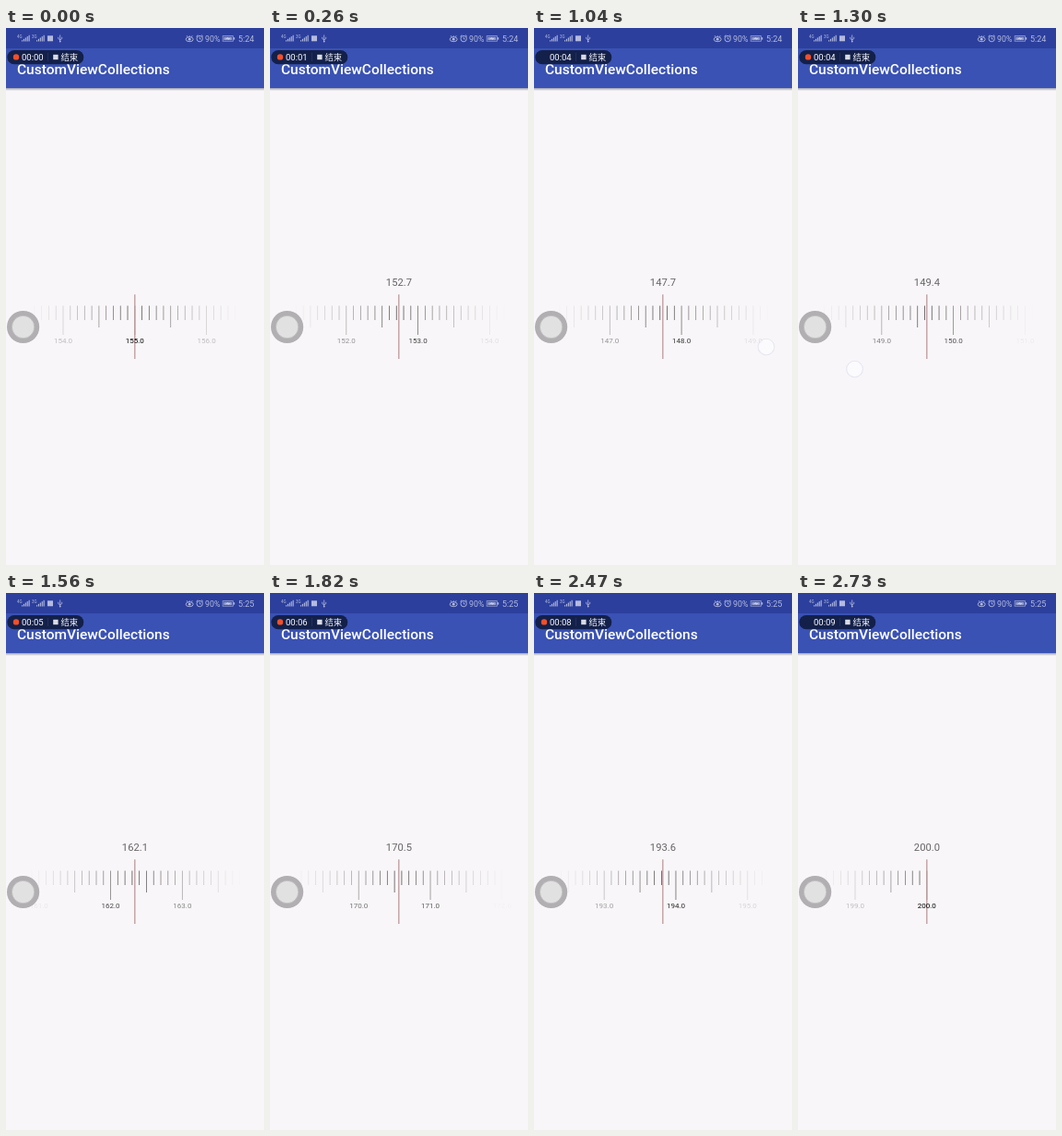
Write an HTML page with a canvas that moves like this. It is 280 by 581 pixels and loops after 2.86 s.

```html
<!DOCTYPE html>
<html lang="en">
<head>
<meta charset="utf-8">
<title>Ruler view</title>
<style>
html, body { margin: 0; width: 100%; height: 100%; overflow: hidden; background: #f8f6f8; }
canvas { display: block; width: 280px; height: 581px; }
</style>
</head>
<body>
<canvas id="stage"></canvas>
<script>
const W = 280, H = 581, STEP = 130, COUNT = 22;
const CENTER = 139.8, UNIT = 77.8, FADE = 120, MAX = 200;
const ICON = '#b4bbde';
const SANS = 'Roboto, "Noto Sans", sans-serif';
const CJK = '"Noto Sans CJK SC", "Noto Sans CJK", sans-serif';

const lerp = (a, b, u) => a + (b - a) * u;
const settle = u => 1 - Math.pow(1 - u, 1.28);
const fling = u => u * u * (3 - 2 * u);

// Ruler moves, in steps
const moves = [
  { start: 0, end: 6, from: 155, to: 149.4, ease: settle },
  { start: 6, end: 9, from: 149.4, to: 147.2, ease: settle },
  { start: 9, end: 14, from: 147.2, to: 170.56, ease: fling },
  { start: 14.225, end: 21, from: 170.56, to: MAX, ease: fling }
];

// Finger strokes, in steps
const swipes = [
  { start: 6, end: 8, from: [161.5, 327], to: [252, 345] },
  { start: 9, end: 10, from: [200, 352], to: [61.5, 369] },
  { start: 16, end: 17, from: [170, 338], to: [83.5, 346] }
];

const canvas = document.getElementById('stage');
const ctx = canvas.getContext('2d');
const dpr = window.devicePixelRatio || 1;
canvas.width = W * dpr;
canvas.height = H * dpr;
ctx.scale(dpr, dpr);

function valueAt(step) {
  const m = moves.filter(move => move.start <= step).pop() || moves[0];
  const u = Math.min(1, Math.max(0, (step - m.start) / (m.end - m.start)));
  return lerp(m.from, m.to, m.ease(u));
}

function rect(x, y, w, h, color) {
  ctx.fillStyle = color;
  ctx.fillRect(x, y, w, h);
}

function disc(x, y, r, fill, stroke, width = 1) {
  ctx.beginPath();
  ctx.arc(x, y, r, 0, Math.PI * 2);
  if (fill) { ctx.fillStyle = fill; ctx.fill(); }
  if (stroke) { ctx.strokeStyle = stroke; ctx.lineWidth = width; ctx.stroke(); }
}

function path(points, color, width) {
  ctx.beginPath();
  points.forEach(([x, y], i) => i ? ctx.lineTo(x, y) : ctx.moveTo(x, y));
  ctx.strokeStyle = color;
  ctx.lineWidth = width;
  ctx.stroke();
}

function text(str, x, y, size, color, align = 'left', weight = 400, family = SANS) {
  ctx.font = `${weight} ${size}px ${family}`;
  ctx.fillStyle = color;
  ctx.textAlign = align;
  ctx.fillText(str, x, y);
}

function signal(x, label) {
  text(label, x, 11, 4.5, ICON);
  for (let i = 0; i < 5; i++) {
    const h = 1.3 + i * 1.35;
    rect(x + 5 + i * 1.9, 14.5 - h, 1.1, h, ICON);
  }
}

function usb(x) {
  path([[x, 7.5], [x, 15]], ICON, 0.8);
  path([[x - 2, 9.8], [x - 2, 11.5], [x, 13], [x + 2, 11.5], [x + 2, 9.8]], ICON, 0.8);
  disc(x, 14.6, 0.9, ICON);
}

function eye(x, y) {
  ctx.beginPath();
  ctx.ellipse(x, y, 4, 2.5, 0, 0, Math.PI * 2);
  ctx.strokeStyle = ICON;
  ctx.lineWidth = 0.9;
  ctx.stroke();
  disc(x, y, 1.4, ICON);
  for (let i = -1; i <= 1; i++) path([[x + i * 2, y - 2.4], [x + i * 3, y - 4]], ICON, 0.8);
}

function alarm(x, y) {
  disc(x, y, 3.2, null, ICON, 0.9);
  path([[x, y - 2], [x, y + 0.3], [x + 1.6, y + 0.3]], ICON, 0.8);
  for (const side of [-1, 1]) path([[x + side * 3.7, y - 2.3], [x + side * 1.9, y - 4]], ICON, 0.9);
}

function battery(x, y) {
  ctx.strokeStyle = '#98a2d0';
  ctx.lineWidth = 0.8;
  ctx.strokeRect(x, y, 11.3, 5.6);
  rect(x + 1.1, y + 1.1, 9, 3.4, '#929ccd');
  rect(x + 11.8, y + 1.6, 1.2, 2.4, ICON);
  path([[x + 3.5, y + 3.2], [x + 5.8, y + 2], [x + 5.8, y + 3.6], [x + 8, y + 2.4]], '#dfe3f3', 0.8);
}

function statusBar(step) {
  rect(0, 0, W, 22, '#2c3f9d');
  signal(12, '4G');
  signal(28, '3G');
  rect(45, 8.3, 6, 6, ICON);
  usb(58.7);
  eye(199.2, 12.2);
  alarm(210.2, 11.6);
  text('90%', 216, 14.6, 8.8, ICON);
  battery(235.2, 8.6);
  text(step < 12 ? '5:24' : '5:25', 252, 14.6, 9, ICON);
}

function appBar() {
  const shade = ctx.createLinearGradient(0, 65, 0, 68);
  shade.addColorStop(0, 'rgba(40,45,80,.42)');
  shade.addColorStop(1, 'rgba(40,45,80,0)');
  rect(0, 65, W, 3, shade);
  rect(0, 22, W, 43, '#3a52b4');
  text('CustomViewCollections', 12, 49.6, 15.5, '#fff', 'left', 500);
}

function recorder(step) {
  const time = 0.92 + step * 0.4;
  ctx.beginPath();
  ctx.roundRect(1.3, 24, 83, 15.3, 7.6);
  ctx.fillStyle = '#13204a';
  ctx.fill();
  if (time % 1 >= 0.5) disc(11, 31.4, 3.2, '#f04f2b');
  text('00:0' + Math.floor(time), 17, 35, 9.5, '#fff');
  rect(45.3, 27, 0.7, 9, '#2c3966');
  rect(51.2, 28.8, 5.4, 5.4, '#d9dbe4');
  text('结束', 59.4, 35, 9.4, '#eceef5', 'left', 400, CJK);
}

function ruler(step) {
  const value = valueAt(step);
  const reach = FADE / UNIT;
  const first = Math.ceil((value - reach) * 10);
  const last = Math.floor(Math.min(MAX, value + reach) * 10);
  const xOf = n => CENTER + (n / 10 - value) * UNIT;
  const alphaOf = x => Math.pow(Math.max(0, 1 - Math.abs(x - CENTER) / FADE), 1.4);

  for (let n = first; n <= last; n++) {
    const x = xOf(n);
    const len = n % 10 === 0 ? 31.5 : n % 5 === 0 ? 23.5 : 15.5;
    rect(x - 0.4, 300.5, 0.8, len, `rgba(40,34,36,${alphaOf(x) * 0.8})`);
  }
  rect(CENTER - 0.7, 288.3, 1.4, 69.7, '#bf9fa4');
  for (let n = Math.ceil(first / 10) * 10; n <= last; n += 10) {
    const x = xOf(n);
    text((n / 10).toFixed(1), x, 340.8, 8, `rgba(0,0,0,${alphaOf(x)})`, 'center');
  }
  if (step > 0) {
    // The readout trails the ruler slightly
    const shown = Math.floor(valueAt(step - 0.035) * 10 + 0.05) / 10;
    text(shown.toFixed(1), 139.9, 279, 11.2, '#666466', 'center');
  }
}

function touch(step) {
  const s = swipes.find(({ start, end }) => step >= start && step <= end);
  if (!s) return;
  const u = (step - s.start) / (s.end - s.start);
  const [x, y] = s.from.map((from, i) => lerp(from, s.to[i], u));
  const a = 1 - 0.65 * u;
  disc(x, y, 8.8, `rgba(252,252,255,${0.5 + a * 0.4})`, `rgba(185,192,218,${a * 0.8})`, 1.1);
}

function ball() {
  disc(18.6, 323.5, 17.6, '#b1afb1');
  disc(18.6, 323.5, 12.2, '#e2e1e2', '#bcbabc', 0.8);
}

function draw(step) {
  rect(0, 0, W, H, '#f8f6f8');
  appBar();
  statusBar(step);
  recorder(step);
  ruler(step);
  touch(step);
  ball();
}

const start = performance.now();
function tick() {
  const t = Math.max(0, performance.now() - start);
  draw(Math.floor(t / STEP) % COUNT);
  requestAnimationFrame(tick);
}
tick();
</script>
</body>
</html>
```
